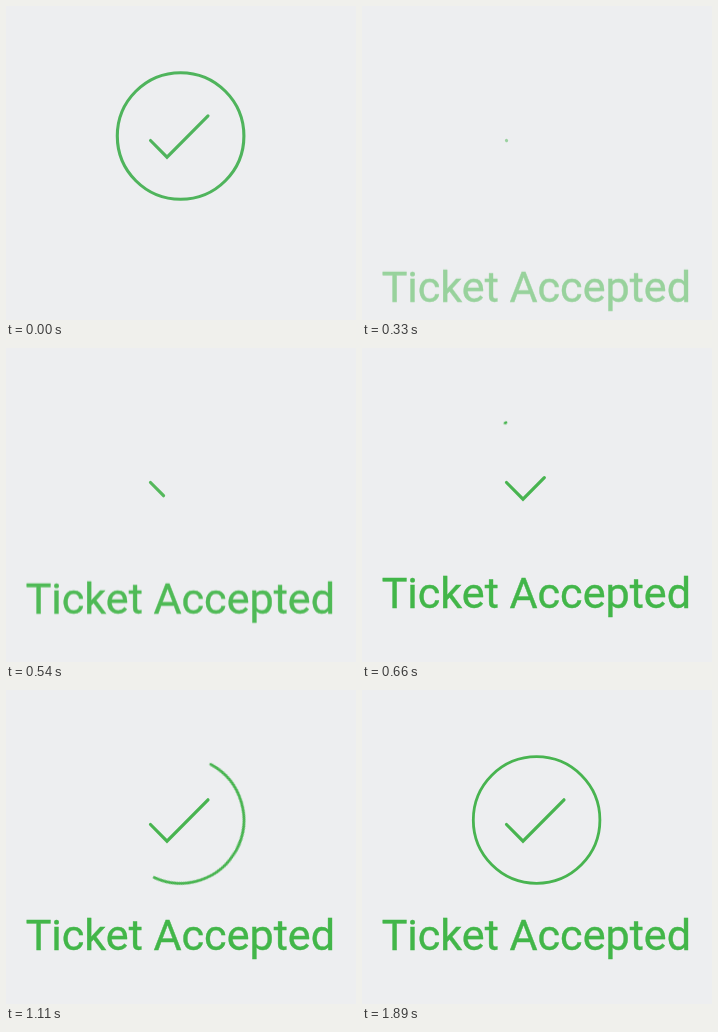
These frames come from a looping animation (350 px wide and 314 px high, 1920 ms). An HTML page:

```html
<!DOCTYPE html>
<html lang="en">
<head>
<meta charset="utf-8">
<title>Ticket Accepted</title>
<style>
  html, body { margin: 0; width: 100%; height: 100%; overflow: hidden; background: #edeef0; }
  svg { display: block; width: 100%; height: 100%; }
  text {
    font: 43.1px Roboto, sans-serif; text-anchor: middle;
    fill: #42b649; stroke: #42b649; stroke-width: .4;
  }
  .line { fill: none; stroke: #48b450; stroke-width: 2.8; stroke-linecap: round; stroke-linejoin: miter; }
  .tick { stroke-width: 3.2; }
  .still .line { stroke: #4fb45c; stroke-width: 3.1; }

  .still, .live, .fade, .rise, .tick, .ring { animation: 1920ms linear infinite; }
  .still { animation-name: still; animation-timing-function: step-end; }
  .live { animation-name: live; animation-timing-function: step-end; }
  .fade { animation-name: fade; }
  .rise { animation-name: rise; }
  .tick { animation-name: tick; }
  .ring { animation-name: ring; transform-origin: 174.6px 130px; }

  /* the finished icon flashes alone for 30 ms at the start of each loop */
  @keyframes still { 0% { opacity: 1 } 1.5625%, 100% { opacity: 0 } }
  @keyframes live { 0% { opacity: 0 } 1.5625%, 100% { opacity: 1 } }

  @keyframes fade {
    0% { opacity: 0; animation-timing-function: cubic-bezier(.37, 0, .63, 1) }
    34.4%, 100% { opacity: 1 }
  }
  @keyframes rise {
    0% { transform: translateY(72px); animation-timing-function: cubic-bezier(.37, 0, .63, 1) }
    34.4%, 100% { transform: none }
  }
  @keyframes tick {
    0%, 21.2% { stroke-dasharray: .1 200; animation-timing-function: cubic-bezier(.37, 0, .63, 1) }
    43.2%, 100% { stroke-dasharray: 100 200 }
  }
  @keyframes ring {
    0%, 32.86% { stroke-dasharray: 0 720; transform: rotate(-120deg); opacity: 0 }
    32.87% {
      stroke-dasharray: 0 720; transform: rotate(-120deg); opacity: 1;
      animation-timing-function: cubic-bezier(.37, 0, .63, 1)
    }
    83.59%, 100% { stroke-dasharray: 360 720; transform: rotate(0deg); opacity: 1 }
  }
</style>
</head>
<body>
<svg viewBox="0 0 350 314">
  <g class="still">
    <circle class="line" cx="174.6" cy="130" r="63.3"/>
    <path class="line" d="M144.5 134.5 161 151.2 202 109.8"/>
  </g>
  <g class="live">
    <g class="fade">
      <circle class="line ring" cx="174.6" cy="130" r="63.3" pathLength="360"/>
      <path class="line tick" d="M144.5 134.5 161 151.2 202 109.8" pathLength="100"/>
      <g class="rise"><text x="174.3" y="260">Ticket Accepted</text></g>
    </g>
  </g>
</svg>
</body>
</html>
```
